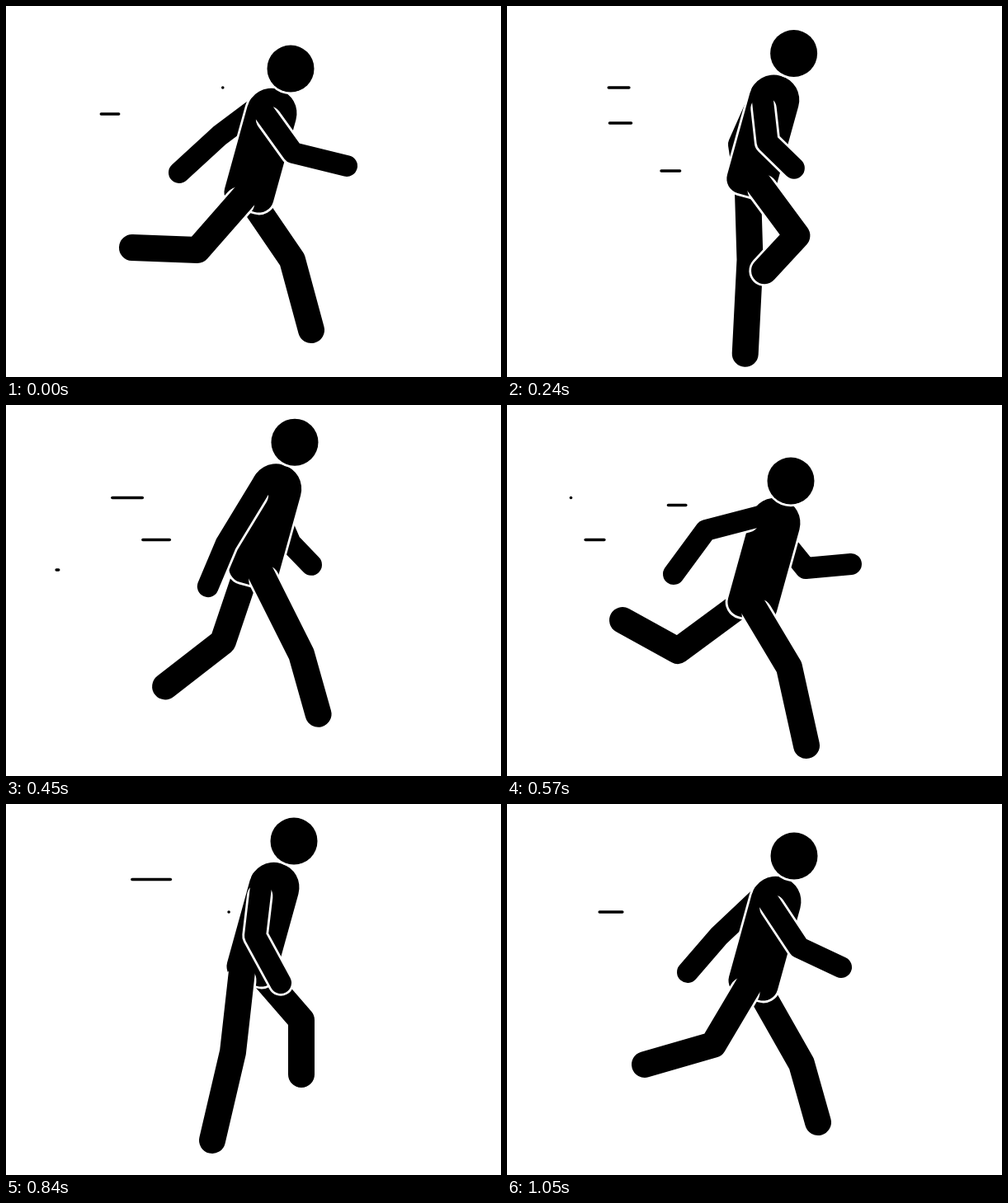
An HTML page with a canvas that plays this animation: 600 px wide and 450 px high, repeating every 1.08 s.

```html
<!DOCTYPE html>
<html>
<head>
<meta charset="utf-8">
<style>
html, body { margin: 0; width: 100%; height: 100%; overflow: hidden; background: #fff; }
canvas { display: block; }
</style>
</head>
<body>
<canvas id="stage" width="600" height="450"></canvas>
<script>
const ctx = document.getElementById('stage').getContext('2d');
const LOOP = 1080, HALF = LOOP / 2, STEP = 30;
const LEAN = 0.27;
const HIP = [-26, 93], SHOULDER = [-15, -9];

// time, head x, head y, chest x, chest y
const bodyKeys = [
  [0, 345, 76, 322, 130], [80, 345, 96, 323, 146], [150, 345, 78, 322, 134],
  [330, 349, 39, 325, 96], [372, 349, 37, 325, 94], [570, 344, 92, 325, 143],
  [690, 346, 78, 324, 132], [840, 349, 45, 325, 101], [1050, 348, 63, 326, 118]
];

// root shift, middle joint x y, end x y at each pose time
const poseTimes = [0, 150, 330, 570, 690, 840, 1050];
const nearLegPoses = [
  [0, 232, 296, 153, 293], [0, 308, 308, 236, 270], [0, 350, 256, 359, 344],
  [-6, 342, 318, 363, 413], [0, 317, 325, 316, 413], [-12, 275, 301, 250, 408],
  [-2, 250, 292, 167, 316]
];
const farLegPoses = [
  [-7, 347, 308, 370, 393], [0, 319, 318, 314, 414], [-14, 265, 298, 223, 383],
  [-8, 207, 298, 140, 261], [0, 308, 320, 238, 279], [0, 358, 262, 358, 328],
  [-2, 357, 315, 377, 386]
];
const nearArmPoses = [
  [0, 348, 178, 413, 194], [0, 343, 184, 404, 196], [0, 301, 162, 318, 217],
  [0, 241, 152, 202, 205], [0, 247, 160, 243, 213], [0, 302, 160, 333, 217],
  [0, 354, 174, 405, 198]
];
const farArmPoses = [
  [0, 259, 157, 210, 202], [0, 248, 165, 218, 204], [0, 306, 156, 324, 195],
  [0, 362, 198, 417, 193], [0, 330, 203, 381, 203], [0, 303, 158, 322, 200],
  [0, 257, 160, 219, 204]
];

// y, birth time, start x, speed, longest length, leftmost centre
const windLines = [
  [99, 1072, 267, 0.53, 40, 0], [142, 34, 252, 0.556, 32, 0],
  [200, 140, 263, 0.647, 32, 0], [112.5, 245, 266, 0.58, 43, 0],
  [163.5, 320, 264, 0.63, 38, 0], [121.5, 462, 262, 0.517, 29, 0],
  [91.5, 678, 302, 0.777, 50, 0], [131, 830, 277, 0.69, 36, 126]
];
const WIND_LIFE = 330;

// Fill one side's cycle with the other side's keys, half a loop later.
function mergeCycle(own, other) {
  const shifted = other.map(([t, ...v]) => [(t + HALF) % LOOP, ...v]);
  const extra = shifted.filter(k => !own.some(o => o[0] === k[0]));
  return [...own, ...extra].sort((a, b) => a[0] - b[0]);
}

// Smooth cyclic curve through the keys.
function sample(keys, t) {
  const n = keys.length;
  const key = i => {
    const lap = Math.floor(i / n);
    const [time, ...v] = keys[i - lap * n];
    return [time + lap * LOOP, ...v];
  };
  const i = keys.filter(k => k[0] <= t).length - 1;
  const [a, b, c, d] = [-1, 0, 1, 2].map(o => key(i + o));
  const h = c[0] - b[0], u = (t - b[0]) / h;
  const tangent = (p, q, r, j) => {
    const left = q[0] - p[0], right = r[0] - q[0];
    return ((q[j] - p[j]) / left * right + (r[j] - q[j]) / right * left) / (left + right);
  };
  return b.slice(1).map((start, k) => {
    const j = k + 1, end = c[j];
    const m0 = tangent(a, b, c, j) * h, m1 = tangent(b, c, d, j) * h;
    return start + u * (m0 + u * (3 * (end - start) - 2 * m0 - m1 + u * (2 * (start - end) + m0 + m1)));
  });
}

const bodyCycle = mergeCycle(bodyKeys, bodyKeys);

function rootAt(t, offset, shift) {
  const [, , x, y] = sample(bodyCycle, t);
  return [x + offset[0] + shift, y + offset[1]];
}

function toAngles(poses, offset) {
  return poses.map(([shift, mx, my, ex, ey], i) => {
    const t = poseTimes[i], [x, y] = rootAt(t, offset, shift);
    return [t, shift, Math.atan2(mx - x, my - y), Math.hypot(mx - x, my - y),
      Math.atan2(ex - mx, ey - my), Math.hypot(ex - mx, ey - my)];
  });
}

function limbPair(near, far, offset, radius) {
  const a = toAngles(near, offset), b = toAngles(far, offset);
  return [mergeCycle(a, b), mergeCycle(b, a)].map(keys => ({ keys, offset, radius }));
}

const [nearLeg, farLeg] = limbPair(nearLegPoses, farLegPoses, HIP, 16);
const [nearArm, farArm] = limbPair(nearArmPoses, farArmPoses, SHOULDER, 13);

function strokePath(points, width, color) {
  ctx.lineWidth = width;
  ctx.strokeStyle = color;
  ctx.beginPath();
  points.forEach(p => ctx.lineTo(...p));
  ctx.stroke();
}

function drawLimb({ keys, offset, radius }, t, outlined) {
  const [shift, a1, l1, a2, l2] = sample(keys, t);
  const [x, y] = rootAt(t, offset, shift);
  const along = (px, py, a, l) => [px + Math.sin(a) * l, py + Math.cos(a) * l];
  const mid = along(x, y, a1, l1), end = along(...mid, a2, l2);
  // The outline starts a little below the joint so the limb blends into the torso.
  if (outlined) strokePath([along(x, y, a1, 20), mid, end], radius * 2 + 5.5, '#fff');
  strokePath([[x, y], mid, end], radius * 2, '#000');
}

function fillOutlined() {
  ctx.lineWidth = 5.5;
  ctx.strokeStyle = '#fff';
  ctx.stroke();
  ctx.fill();
}

function drawBody(t) {
  const [hx, hy, x, y] = sample(bodyCycle, t);
  ctx.save();
  ctx.translate(x, y);
  ctx.rotate(LEAN);
  ctx.beginPath();
  ctx.roundRect(-30.5, -30, 61, 151, [30, 30, 18, 18]);
  fillOutlined();
  ctx.restore();
  ctx.beginPath();
  ctx.arc(hx, hy, 28.5, 0, Math.PI * 2);
  fillOutlined();
}

function drawWind(t) {
  for (const [y, birth, x0, speed, longest, leftmost] of windLines) {
    const age = (t - birth + LOOP) % LOOP;
    if (age >= WIND_LIFE) continue;
    const x = Math.max(leftmost, x0 - speed * age);
    const half = Math.max(0.1, longest * Math.sin(Math.PI * age / WIND_LIFE) - 3.5) / 2;
    strokePath([[x - half, y], [x + half, y]], 3.5, '#000');
  }
}

function draw(t) {
  ctx.fillStyle = '#fff';
  ctx.fillRect(0, 0, 600, 450);
  ctx.fillStyle = '#000';
  ctx.lineCap = ctx.lineJoin = 'round';
  drawWind(t);
  drawLimb(farArm, t);
  drawLimb(farLeg, t);
  drawBody(t);
  drawLimb(nearLeg, t, true);
  drawLimb(nearArm, t, true);
}

const start = performance.now();
function tick() {
  const t = (performance.now() - start) % LOOP;
  draw(Math.floor(t / STEP) * STEP);
  requestAnimationFrame(tick);
}
tick();
</script>
</body>
</html>
```
